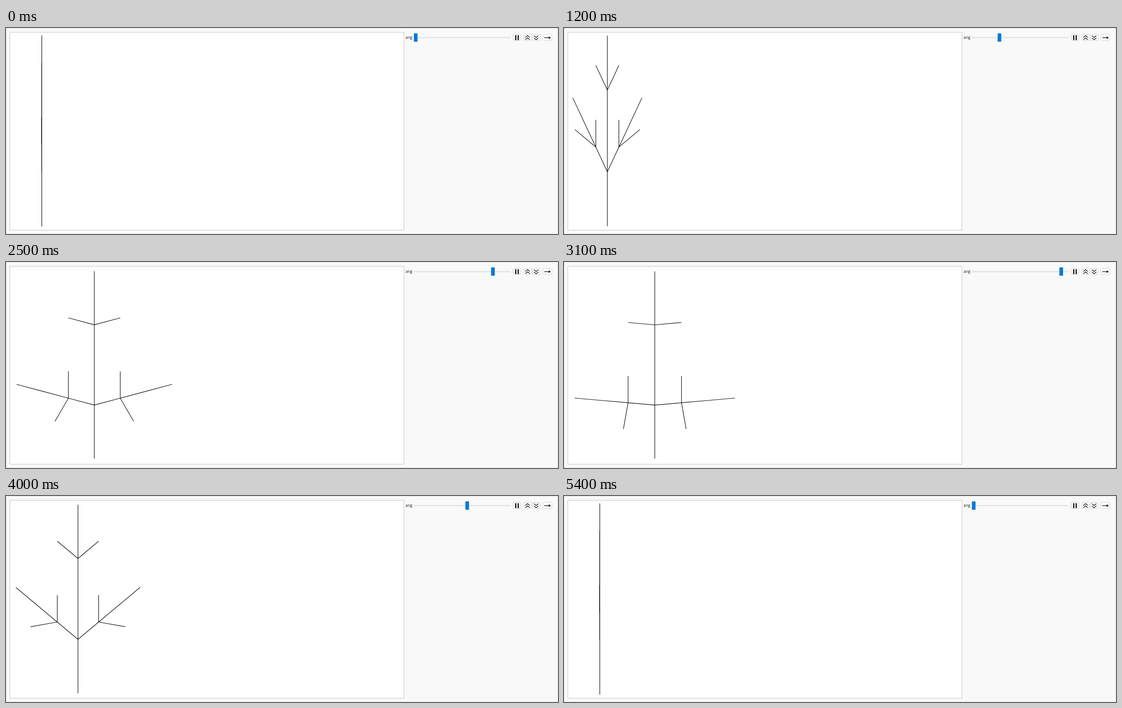
Write an HTML page that moves like this. It is 1224 px wide and 458 px high and loops after 6000 ms.

```html
<!DOCTYPE html>
<html lang="en">
<head>
<meta charset="utf-8">
<title>Branching angle</title>
<style>
  html, body { margin: 0; width: 100%; height: 100%; overflow: hidden; background: #f9f9f9; }
  svg { display: block; width: 1224px; height: 458px; }
  text { font: 8.8px "Open Sans", "Noto Sans", sans-serif; fill: #111; }
  .button rect { fill: #fdfdfd; stroke: #d0d0d0; }
  .icon { fill: none; stroke: #111; stroke-width: 1.4; }
  #tree { fill: none; stroke: #000; stroke-width: 1.15; }
</style>
</head>
<body>
<svg viewBox="0 0 1224 458">
  <rect width="1224" height="458" fill="#fff"/>
  <rect x=".5" y=".5" width="1222" height="457" fill="#f9f9f9" stroke="#e2e2e2"/>
  <rect x="8.5" y="9.5" width="874" height="440" fill="#fff" stroke="#c3c3c3"/>
  <g id="tree"></g>
  <text x="886" y="24">ang</text>
  <rect x="904" y="20.5" width="215" height="2" fill="#dcdcdc"/>
  <rect id="handle" x="904.5" y="12" width="8" height="18.5" fill="#0078d7"/>
  <g class="button">
    <rect x="1124.5" y="14" width="17" height="14" rx="2"/>
    <rect x="1148.5" y="14" width="17" height="14" rx="2"/>
    <rect x="1167.5" y="14" width="17" height="14" rx="2"/>
    <rect x="1190.5" y="14" width="20" height="14" rx="2"/>
  </g>
  <path d="M1129 16h2.6v11h-2.6zM1134.5 16h2.6v11h-2.6z" fill="#111"/>
  <path class="icon" d="M1151.5 21l5-4 5 4M1151.5 26l5-4 5 4M1170.5 17l5 4 5-4M1170.5 22l5 4 5-4"/>
  <path class="icon" d="M1193.5 21.5h11"/>
  <path d="M1203.5 18.5l4.5 3-4.5 3z" fill="#111"/>
</svg>
<script>
const LOOP = 6000, STEP = 5, MAX = 90;
const RISES = [600, 700, 900, 1000, 1200, 1300, 1400, 1600, 1700, 1800,
  2000, 2100, 2200, 2400, 2500, 2700, 2800, 2900];
const FALLS = RISES.map(t => LOOP - t).reverse();

const tree = document.getElementById("tree");
const handle = document.getElementById("handle");

const passed = (times, t) => times.filter(at => at <= t).length;
const angleAt = t => STEP * (passed(RISES, t) - passed(FALLS, t));

// Expand the branching rule twice; the last buds become plain segments.
function grow(depth) {
  let plant = "X";
  for (let i = 0; i < depth; i++) {
    plant = plant.replace(/[XF]/g, c => c === "F" ? "FF" : "F[+X][-X]FX");
  }
  return plant.replace(/X/g, "F");
}
const PLANT = grow(2);

function trace(x, y, unit, turn) {
  const stack = [], paths = [];
  let heading = 0, path = [[x, y]];
  const finish = () => { if (path.length > 1) paths.push(path); };
  for (const c of PLANT) {
    if (c === "F") {
      x += unit * Math.sin(heading);
      y -= unit * Math.cos(heading);
      path.push([x, y]);
    } else if (c === "+") heading -= turn;
    else if (c === "-") heading += turn;
    else if (c === "[") {
      stack.push([x, y, heading, path]);
      path = [[x, y]];
    } else {
      finish();
      [x, y, heading, path] = stack.pop();
    }
  }
  finish();
  return paths.map(p =>
    `<path d="M${p.map(q => q.map(v => v.toFixed(2)).join(" ")).join("L")}"/>`).join("");
}

function draw(angle) {
  // Both ends of the slider collapse to a bare stem, framed one unit to each side.
  const turn = (angle % MAX) * Math.PI / 180;
  const spread = turn ? Math.sin(turn) : 1 / 3;
  const unit = (429.2 - 13 * spread) / 7;
  const half = 3 * unit * spread;
  tree.innerHTML = trace(16.2 + 1.0415 * half, 443.5 - 6.5 * spread, unit, turn);
  handle.setAttribute("x", 904.5 + 2.283 * angle);
}

let shown = -1;
const start = performance.now();
function tick() {
  const angle = angleAt((performance.now() - start) % LOOP);
  if (angle !== shown) draw(shown = angle);
  requestAnimationFrame(tick);
}
tick();
</script>
</body>
</html>
```
